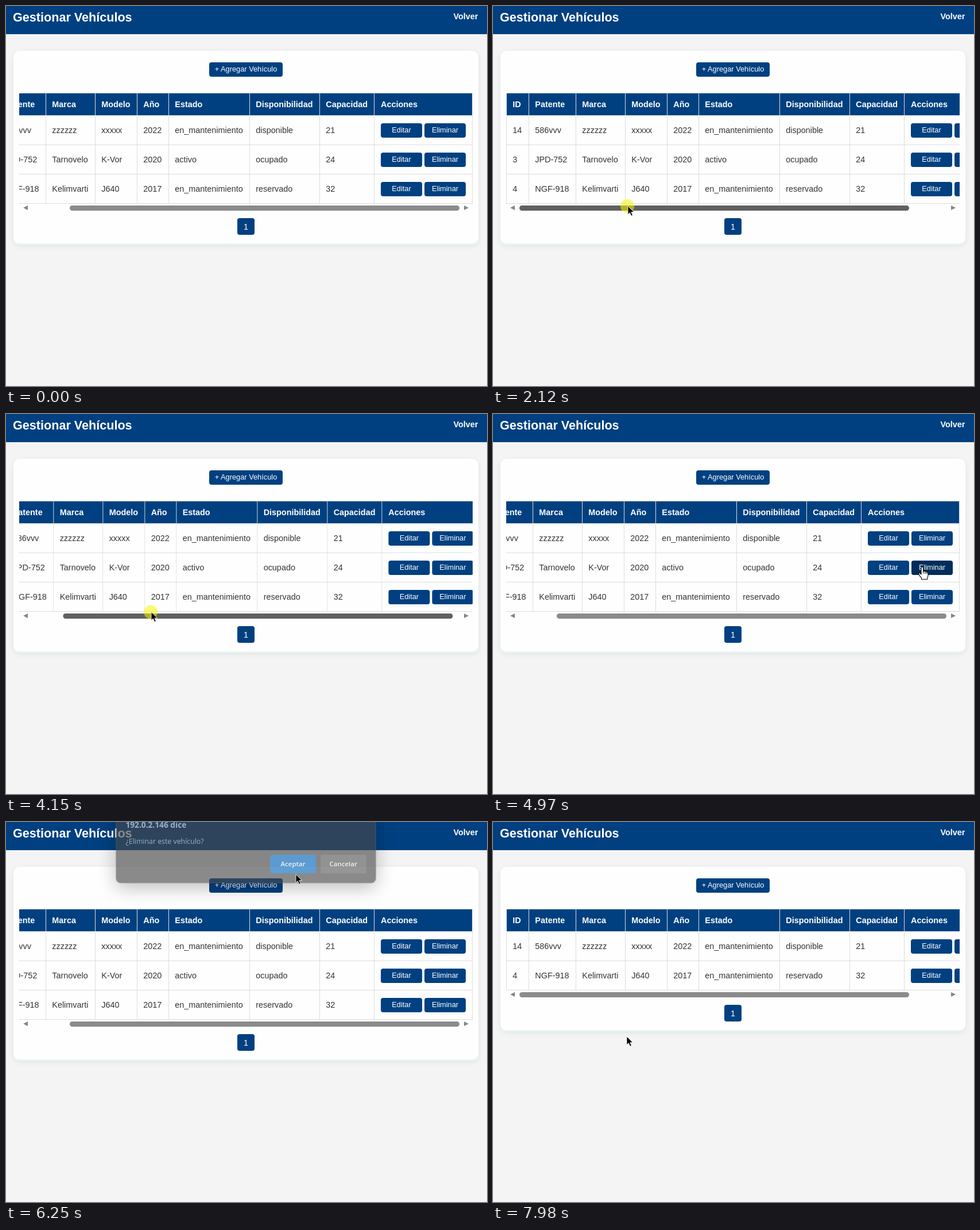
Write an HTML page that moves like this. It is 838 by 661 pixels and loops after 8 s.

```html
<!DOCTYPE html>
<html lang="es">
<head>
<meta charset="utf-8">
<title>Gestionar Vehículos</title>
<style>
@property --scroll { syntax: "<number>"; inherits: true; initial-value: 1; }

* { box-sizing: border-box; }
html, body { margin: 0; width: 100%; height: 100%; overflow: hidden; }
body { background: #f4f4f4; font-family: "Liberation Sans", Arial, sans-serif; }

.stage { position: relative; width: 838px; height: 661px; overflow: hidden; animation: scroll 8s linear infinite; }
.stage > *, .foot > * { position: absolute; }

header { left: 0; top: 0; width: 838px; height: 49px; background: #004080; color: #fff; font-weight: bold; }
header span { position: absolute; white-space: nowrap; }
.title { left: 12px; top: 5px; font-size: 21.6px; line-height: 30px; }
.back { left: 779.5px; top: 8px; font-size: 14.4px; line-height: 20px; }

.card {
  left: 13px; top: 78px; width: 810px; height: 335px; border-radius: 10px; background: #fefefe;
  box-shadow: 0 2px 0 #e4f8f7, 0 4px 12px rgba(0, 0, 0, .07);
  animation: shrink 8s step-end infinite;
}
.btn {
  display: inline-block; background: #004080; color: #fff; border-radius: 4px;
  font-size: 12.8px; text-align: center; white-space: nowrap;
}
.add { left: 354px; top: 98px; width: 128px; height: 25px; line-height: 24px; }

.view { left: 23px; top: 151px; width: 790px; height: 193px; overflow: hidden; }
table {
  width: 865px; table-layout: fixed; border-collapse: separate; border-spacing: 0;
  font-size: 14.4px; color: #333; transform: translateX(calc(var(--scroll) * -75px));
}
th, td { border: solid #ddd; border-width: 0 1px 1px 0; padding: 0 0 0 10.3px; text-align: left; white-space: nowrap; }
th { height: 40px; border-top-width: 1px; background: #004080; color: #fff; }
td { height: 51px; background: #fefefe; }
th:first-child, td:first-child { border-left-width: 1px; }
th:last-child, td:last-child { padding-left: 11px; }
td:last-child { font-size: 0; }
td .btn { width: 72px; height: 25px; line-height: 24px; margin-right: 4px; vertical-align: middle; }
.target { animation: hover 8s step-end infinite; }
.last, .foot { animation: lift 8s step-end infinite; }

.foot { left: 23px; top: 344px; width: 790px; height: 60px; }
.arrow { top: 3px; border: solid transparent; border-width: 4.5px 0; }
.arrow.l { left: 7px; border-right: 8px solid #858585; }
.arrow.r { left: 775px; border-left: 8px solid #858585; }
.thumb {
  left: 23px; top: 3px; width: 679px; height: 9px; border-radius: 4.5px; background: #8b8b8b;
  transform: translateX(calc(var(--scroll) * 65px)); animation: thumb 8s step-end infinite;
}
.page { left: 380px; top: 25px; width: 30px; height: 29px; line-height: 30px; font-size: 14.4px; }

.dialog {
  left: 193px; top: -30px; width: 450px; height: 145px; border-radius: 8px; background: #484848;
  border: 1px solid #636363; box-shadow: 0 8px 32px rgba(0, 0, 0, .4); color: #f2f2f2;
  font-family: "Open Sans", "Noto Sans", sans-serif; opacity: 0; animation: dialog 8s linear infinite;
}
.dialog * { position: absolute; white-space: nowrap; line-height: 20px; }
.dialog b { left: 16px; top: 33px; font-size: 13.6px; }
.dialog p { left: 16px; top: 62px; margin: 0; font-size: 12.25px; }
.dialog span {
  top: 95px; width: 79px; height: 32px; line-height: 32px; border-radius: 3px;
  font-size: 11.4px; font-weight: 600; text-align: center;
}
.ok { left: 266px; background: #0469bd; }
.no { left: 353px; background: #5a5a5a; }

.cursor { left: 0; top: 0; width: 0; height: 0; animation: move 8s ease-in-out infinite; }
.cursor svg { position: absolute; left: 0; top: 0; overflow: visible; }
.press { fill: rgba(246, 244, 0, .55); animation: press 8s step-end infinite; }
.pointer { animation: pointer 8s step-end infinite; }
.hand { animation: hand 8s step-end infinite; }

@keyframes scroll {
  0%, 22% { --scroll: 1; animation-timing-function: ease-in-out; }
  25.5%, 49.2% { --scroll: 0; animation-timing-function: ease-in-out; }
  53%, 81.24% { --scroll: 1; }
  81.25%, 100% { --scroll: 0; }
}
@keyframes shrink { 0% { height: 335px; } 81.25%, 100% { height: 284px; } }
@keyframes lift { 0% { transform: none; } 81.25%, 100% { transform: translateY(-51px); } }
@keyframes thumb {
  0%, 31%, 54.6%, 100% { background: #8b8b8b; }
  20.8%, 37.2% { background: #616161; }
}
@keyframes hover { 0%, 70.2%, 100% { background: #004080; } 58% { background: #002d5c; } }
@keyframes dialog {
  0%, 63.4% { opacity: 0; transform: translateY(-25px) scale(1.02); }
  64.5%, 77.5% { opacity: 1; transform: none; }
  79.25%, 100% { opacity: 0; transform: translateY(-25px) scale(1.02); }
}
@keyframes press {
  0%, 28.8%, 53.8%, 64%, 77.3%, 100% { opacity: 0; }
  21.9%, 46.2%, 62.7%, 76% { opacity: 1; }
}
@keyframes pointer { 0%, 58% { opacity: 0; } 1.25%, 70.2%, 100% { opacity: 1; } }
@keyframes hand { 0%, 70.2%, 100% { opacity: 0; } 58% { opacity: 1; } }
@keyframes move {
  0%, 1.25% { transform: translate(802px, 611px); }
  4% { transform: translate(472px, 410px); }
  7% { transform: translate(196px, 153px); }
  11.1%, 11.5% { transform: translate(108px, 190px); }
  13% { transform: translate(86px, 128px); }
  15% { transform: translate(210px, 402px); }
  16.2% { transform: translate(513px, 395px); }
  17.5%, 20.4% { transform: translate(318px, 369px); }
  21.5%, 22% { transform: translate(308px, 350px); }
  25.6% { transform: translate(236px, 348px); }
  26.5% { transform: translate(235px, 348px); }
  30.6% { transform: translate(226px, 352px); }
  33% { transform: translate(4px, 178px); }
  37.6%, 41.8% { transform: translate(189px, 357px); }
  43.4% { transform: translate(189px, 347px); }
  46.5%, 48% { transform: translate(191px, 346px); }
  49.1% { transform: translate(198px, 346px); }
  53.2%, 54% { transform: translate(268px, 344px); }
  58.5% { transform: translate(745px, 266px); }
  62.1% { transform: translate(748px, 266px); }
  64.6% { transform: translate(738px, 266px); }
  69.7% { transform: translate(737px, 264px); }
  75% { transform: translate(508px, 82px); }
  77% { transform: translate(505px, 86px); }
  78.1%, 80.1% { transform: translate(505px, 91px); }
  88.75%, 90.75% { transform: translate(444px, 146px); }
  94% { transform: translate(62px, 250px); }
  97% { transform: translate(260px, 383px); }
  99.7%, 100% { transform: translate(233px, 373px); }
}
</style>
</head>
<body>
<div class="stage">
  <header><span class="title">Gestionar Vehículos</span><span class="back">Volver</span></header>
  <div class="card"></div>
  <div class="btn add">+ Agregar Vehículo</div>

  <div class="view">
    <table>
      <colgroup>
        <col style="width:40px"><col style="width:82px"><col style="width:86px">
        <col style="width:73px"><col style="width:55px"><col style="width:141px">
        <col style="width:122px"><col style="width:95px"><col style="width:171px">
      </colgroup>
      <tr><th>ID<th>Patente<th>Marca<th>Modelo<th>Año<th>Estado<th>Disponibilidad<th>Capacidad<th>Acciones</tr>
      <tr><td>14<td>586vvv<td>zzzzzz<td>xxxxx<td>2022<td>en_mantenimiento<td>disponible<td>21
        <td><span class="btn">Editar</span><span class="btn">Eliminar</span></tr>
      <tr><td>3<td>JPD-752<td>Tarnovelo<td>K-Vor<td>2020<td>activo<td>ocupado<td>24
        <td><span class="btn">Editar</span><span class="btn target">Eliminar</span></tr>
      <tr class="last"><td>4<td>NGF-918<td>Kelimvarti<td>J640<td>2017<td>en_mantenimiento<td>reservado<td>32
        <td><span class="btn">Editar</span><span class="btn">Eliminar</span></tr>
    </table>
  </div>

  <div class="foot">
    <i class="arrow l"></i><div class="thumb"></div><i class="arrow r"></i>
    <div class="btn page">1</div>
  </div>

  <div class="dialog">
    <b>192.0.2.146 dice</b>
    <p>¿Eliminar este vehículo?</p>
    <span class="ok">Aceptar</span><span class="no">Cancelar</span>
  </div>

  <div class="cursor">
    <svg width="1" height="1">
      <circle class="press" cx="-1" r="12"/>
      <path class="pointer" d="M0 0V14.6L3.3 11.5 5.8 17.2 8.3 16.1 5.8 10.6H10.6Z" stroke="#fff" stroke-width=".8"/>
      <g class="hand" stroke="#000" stroke-width="1.1" stroke-linejoin="round">
        <path fill="#fff" d="M-2 2q0-2 1.8-2t1.8 2V7.5q1.8-1 3.2.4 1.9-.6 2.9.8 2.3-.4 2.3 2v4q0 2-1.2 3.8v3H-1.5v-2.3q-3.7-3.8-5-7.2 0-2 1.8-1.6L-2 13Z"/>
        <path fill="none" d="M1.6 7.5v4M4.8 8v4M7.7 9v3"/>
      </g>
    </svg>
  </div>
</div>
</body>
</html>
```
